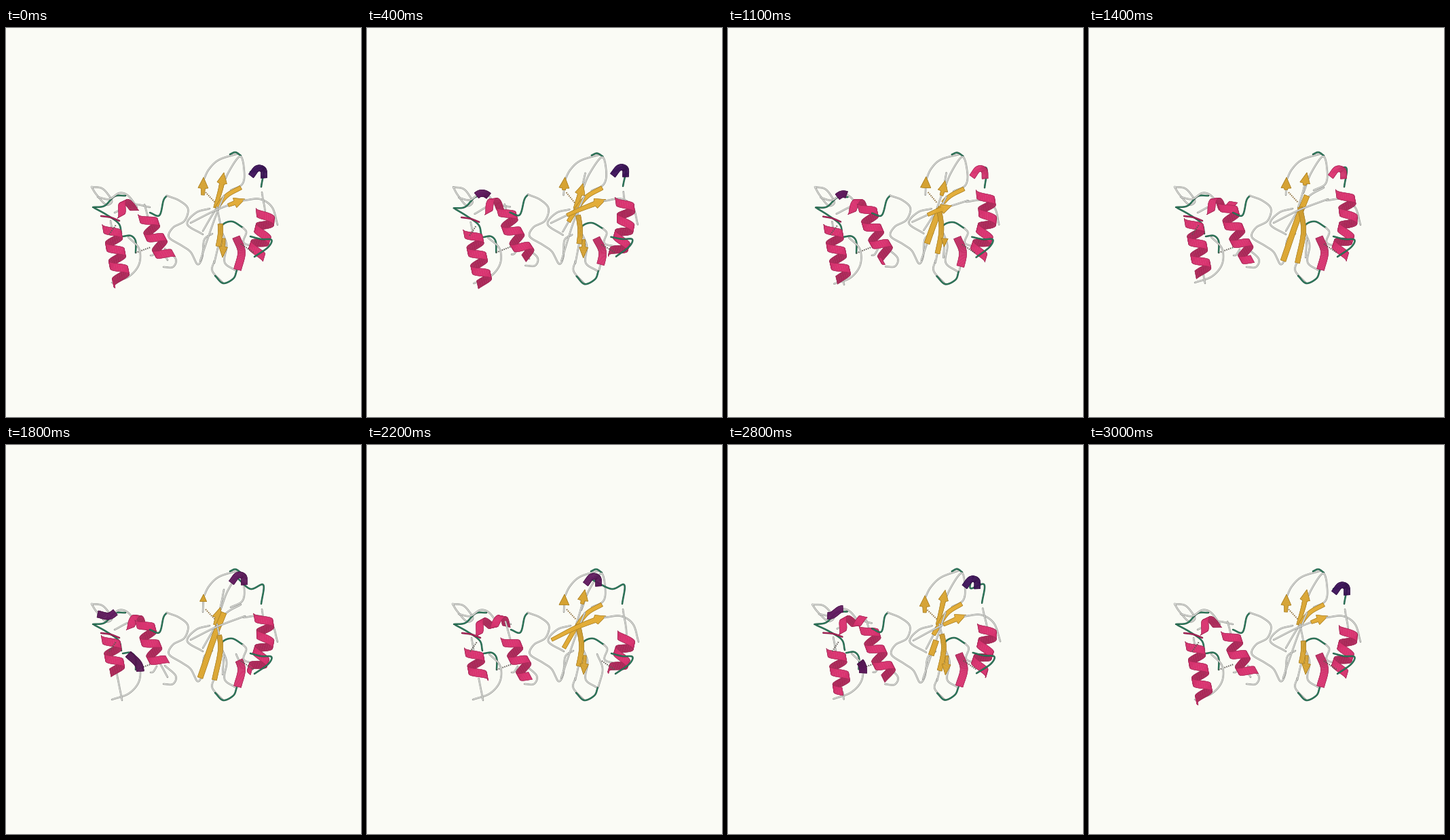
Recreate the animation shown at these times as a matplotlib script. Size 523 by 573 pixels, loop 3100 ms.

```python
import itertools

import matplotlib.pyplot as plt
import numpy as np
from matplotlib.animation import FuncAnimation
from matplotlib.collections import PolyCollection
from matplotlib.colors import to_rgb

W_PX, H_PX, DPI = 523, 573, 64
PT = 72 / DPI
BG = "#fafbf5"
WHITE, GREEN, PINK, GOLD = "#cbccc8", "#2c765a", "#d6336f", "#dba632"
VIOLET, PLUM, WINE = "#3d1358", "#5e195c", "#a82458"
STEPS = 31
POSE_STEPS = [0, 7, 14, 18, 22, 25, 30]  # the last pose is the first again
PATCH_COLORS = [VIOLET, VIOLET, PINK, PLUM, PLUM, PINK, VIOLET]
PITCH = 27

fig = plt.figure(figsize=(W_PX / DPI, H_PX / DPI), dpi=DPI, facecolor=BG)
ax = fig.add_axes([0, 0, 1, 1])
order = itertools.count(1)
state = {"step": 0, "amp": 0.0, "phase": np.zeros(4)}


def tone(color, k):
    return tuple(np.clip(np.array(to_rgb(color)) * k, 0, 1))


def now(value):
    """A constant, or one value per pose eased to the current step."""
    if np.isscalar(value):
        return value
    return np.interp(state["step"], POSE_STEPS, [*value, value[0]])


def wobble(p):
    a, b, c, d = state["phase"]
    x, y = p[:, 0] / 28, p[:, 1] / 28
    dx = np.sin(y + a) + 0.5 * np.sin(x * 1.4 + b)
    dy = np.sin(x + c) + 0.5 * np.sin(y * 1.4 + d)
    return p + state["amp"] * np.column_stack([dx, dy])


def curve(*coords, n=12):
    """Catmull-Rom curve through the given points."""
    p = wobble(np.array(coords, float).reshape(-1, 2))
    q = np.vstack([2 * p[0] - p[1], p, 2 * p[-1] - p[-2]])
    t = np.linspace(0, 1, n, endpoint=False)[:, None]
    out = []
    for a, b, c, d in zip(q, q[1:], q[2:], q[3:]):
        out.append(0.5 * (2 * b + (c - a) * t + (2 * a - 5 * b + 4 * c - d) * t**2
                          + (3 * b - a - 3 * c + d) * t**3))
    return np.vstack(out + [p[-1:]])


def cut(p, start, end, n=36):
    """The piece of a curve between two fractions of its length."""
    s = np.append(0, np.cumsum(np.hypot(*np.diff(p, axis=0).T)))
    t = np.linspace(start, end, n) * s[-1]
    return np.column_stack([np.interp(t, s, p[:, 0]), np.interp(t, s, p[:, 1])])


def tangents(p):
    d = np.gradient(p, axis=0)
    return d / (np.hypot(*d.T)[:, None] + 1e-9)


def stroke(p, color, width, **kw):
    ax.plot(*p.T, color=color, lw=width * PT, zorder=next(order), **kw)


def tube(color, p):
    kw = dict(solid_capstyle="round", solid_joinstyle="round")
    stroke(p, tone(color, 0.66), 2.5, **kw)
    stroke(p, color, 1.4, **kw)
    stroke(p - 0.2, tone(color, 1.15), 0.6, **kw)


def white(*coords):
    tube(WHITE, curve(*coords))


def green(*coords):
    tube(GREEN, curve(*coords))


def dots(*coords, color="#5d5853"):
    stroke(curve(*coords), color, 2, dashes=(0.75, 0.75))


def strip(mid, offset, color, shades):
    left, right = mid - offset, mid + offset
    quads = np.stack([left[:-1], left[1:], right[1:], right[:-1]], axis=1)
    fills = [tone(color, k) for k in shades]
    ax.add_collection(PolyCollection(quads, facecolors=fills, edgecolors=fills,
                                     linewidths=0.5, zorder=next(order)))
    ax.add_patch(plt.Polygon(np.vstack([left, right[::-1]]), fill=False,
                             ec=tone(color, 0.72), lw=0.6 * PT, zorder=next(order)))


def ribbon(p, color, width):
    """Flat band; width may vary along the curve."""
    d = tangents(p)
    side = np.column_stack([-d[:, 1], d[:, 0]]) * np.reshape(width, (-1, 1)) / 2
    strip(p, side, color, 0.86 + 0.18 * np.abs(d[:-1, 0] * 0.8 - d[:-1, 1] * 0.6))


def arrow(p, color, width):
    length = np.hypot(*np.diff(p, axis=0).T).sum()
    left = length * np.linspace(1, 0, len(p))
    head = 16
    ribbon(p, color, np.where(left < head, width * 1.9 * left / head,
                              width * (1 - 0.4 * left / length)))


def coil(p, color, radius):
    """Helical ribbon around a curve, far half-turns first."""
    u = tangents(p)
    normal = np.column_stack([-u[:, 1], u[:, 0]])
    s = np.append(0, np.cumsum(np.hypot(*np.diff(p, axis=0).T)))
    t = np.pi * np.arange(0, 2 * s[-1] / PITCH, 1 / 12)
    at = t * PITCH / (2 * np.pi)

    def along(v):
        return np.column_stack([np.interp(at, s, v[:, k]) for k in (0, 1)])

    mid = along(p) + radius * np.cos(t)[:, None] * along(normal)
    offset, z = along(u) * 6, np.sin(t)
    halves = [slice(k, k + 13) for k in range(0, len(t) - 1, 12)]
    for h in sorted(halves, key=lambda h: z[h].mean()):
        base = 0.95 if z[h].mean() > 0 else 0.86
        strip(mid[h], offset[h], color, base + 0.07 * z[h][:-1])


def fold(shape, color, size, path, start=0, end=1):
    """Folded between two fractions of its path, loose chain on both sides."""
    a, b = now(start), now(end)
    p = curve(*path)
    if b - a < 0.08:
        tube(WHITE, p)
        return
    for lo, hi in ((0, a), (b, 1)):
        if hi - lo > 0.04:
            tube(WHITE, cut(p, lo, hi))
    shape(cut(p, a, b), color, size)


def left_domain():
    white(126, 234, 141, 236, 151, 246, 156, 256, 147, 260, 133, 245, 126, 234)
    green(128, 264, 145, 262, 160, 248, 176, 247)
    green(130, 265, 148, 275, 166, 288, 170, 303)
    tube(WINE, curve(140, 277, 154, 279, 167, 284))
    green(172, 307, 184, 306, 191, 314, 191, 331)
    dots(191, 331, 213, 323)
    white(213, 335, 217, 334, 222, 326)
    white(234, 325, 250, 340, 246, 352, 232, 352)
    fold(ribbon, PLUM, 11, (180, 308, 196, 325, 196, 348, 181, 366, 156, 375),
         start=(0, 0, 0, 0, 0, .45), end=(0, 0, 0, .33, 0, .9))
    fold(ribbon, PLUM, 10, (135, 249, 152, 252, 167, 243, 180, 247, 193, 264),
         start=(.3, .5, .3, 0, 0, 0), end=(.3, 1, .3, .4, .05, .9))
    fold(coil, PINK, 13, (154, 284, 162, 330, 171, 376),
         start=(.1, .2, 0, 0, .2, .4), end=(1, 1, .85, .55, .65, .7))
    dots(152, 304, 162, 290)
    fold(coil, PINK, 9, (160, 272, 186, 260, 212, 264),
         start=(.1, .5, .3, .4, 0, 0), end=(.6, 1, 1, 1, .9, 1))
    fold(coil, PINK, 13, (204, 260, 216, 300, 238, 342),
         start=(.2, 0, 0, 0, .3, 0), end=(.95, .95, 1, .75, 1, 1))


def linker():
    green(212, 272, 226, 276, 232, 254, 237, 247)
    white(237, 247, 255, 254, 268, 266, 263, 284, 246, 294, 240, 308,
          258, 320, 272, 330, 282, 348, 289, 338, 292, 312, 304, 303)


def sheet():
    white(291, 224, 299, 208, 314, 194, 342, 185)
    green(330, 186, 338, 183, 346, 188)
    white(316, 243, 327, 214, 345, 189, 351, 212, 348, 230, 331, 239)
    white(300, 266, 280, 272, 267, 289, 290, 304)
    green(316, 304, 319, 290, 333, 285, 349, 294)
    white(349, 294, 354, 301, 350, 316, 366, 322)
    white(307, 343, 304, 358, 320, 376)
    green(308, 365, 320, 376, 335, 369, 340, 357)
    white(318, 300, 325, 320, 322, 345, 338, 357)
    dots(294, 242, 308, 257, color="#8d6d3a")
    fold(arrow, GOLD, 8, (290, 246, 291, 220), start=(0, .5, .3, .6, .4, 0))
    fold(arrow, GOLD, 8, (308, 265, 316, 238, 321, 213),
         start=(0, 0, .65, 0, .6, 0), end=(1, .5, 1, .5, 1, 1))
    fold(ribbon, GOLD, 6, (346, 235, 324, 248, 306, 272, 290, 299),
         end=(.55, 1, 0, 0, 1, 1))
    fold(ribbon, GOLD, 8, (321, 247, 306, 285, 286, 343),
         start=(.4, .4, 0, 0, .4, .45), end=(.4, .4, 1, 1, .4, 1))
    fold(ribbon, GOLD, 7, (311, 264, 316, 300, 307, 346),
         start=(.3, 0, 0, .2, 0, 0), end=(.7, .6, 1, 1, .75, 1))
    fold(arrow, GOLD, 8, (272, 287, 310, 268, 352, 252),
         start=(.7, 0, .5, .5, 0, .4), end=(1, 1, .5, .5, 1, 1))
    fold(arrow, GOLD, 7, (321, 310, 319, 338), end=(1, 1, 0, 0, 1, 1))


def right_domain(patch_color):
    x, y = now((370, 369, 365, 341, 331, 343)), now((211, 210, 212, 196, 198, 190))
    green(x, y, 360, 212, 379, 206, 376, 234)
    ribbon(curve(x - 9, y + 7, x, y - 4, x + 9, y - 2, x + 10, y + 10), patch_color, 9)
    white(350, 254, 374, 252, 392, 264, 400, 290)
    fold(coil, PINK, 13, (377, 242, 382, 285, 368, 335), start=(.3, 0, 0, .1, .4, .25))
    green(360, 307, 376, 311, 391, 312, 386, 323, 366, 337)
    fold(ribbon, PINK, 11, (339, 308, 347, 330, 341, 356),
         start=(0, 0, 0, .2, .4, 0), end=(1, .7, 1, 1, .4, 1))
    dots(346, 318, 365, 331)


def draw(step):
    """Every step is its own conformation around the eased fold."""
    gaps = np.abs(np.array(POSE_STEPS) - step)
    rng = np.random.default_rng(40 + step)
    state.update(step=step, amp=0.7 * min(gaps.min(), 2),
                 phase=rng.uniform(0, 2 * np.pi, 4))
    ax.clear()
    ax.set(xlim=(0, W_PX), ylim=(H_PX, 0))
    ax.axis("off")
    left_domain()
    linker()
    sheet()
    right_domain(PATCH_COLORS[int(gaps.argmin())])
    return []


anim = FuncAnimation(fig, draw, frames=STEPS, interval=100, repeat=True,
                     repeat_delay=0, init_func=lambda: [])
plt.show()
```
